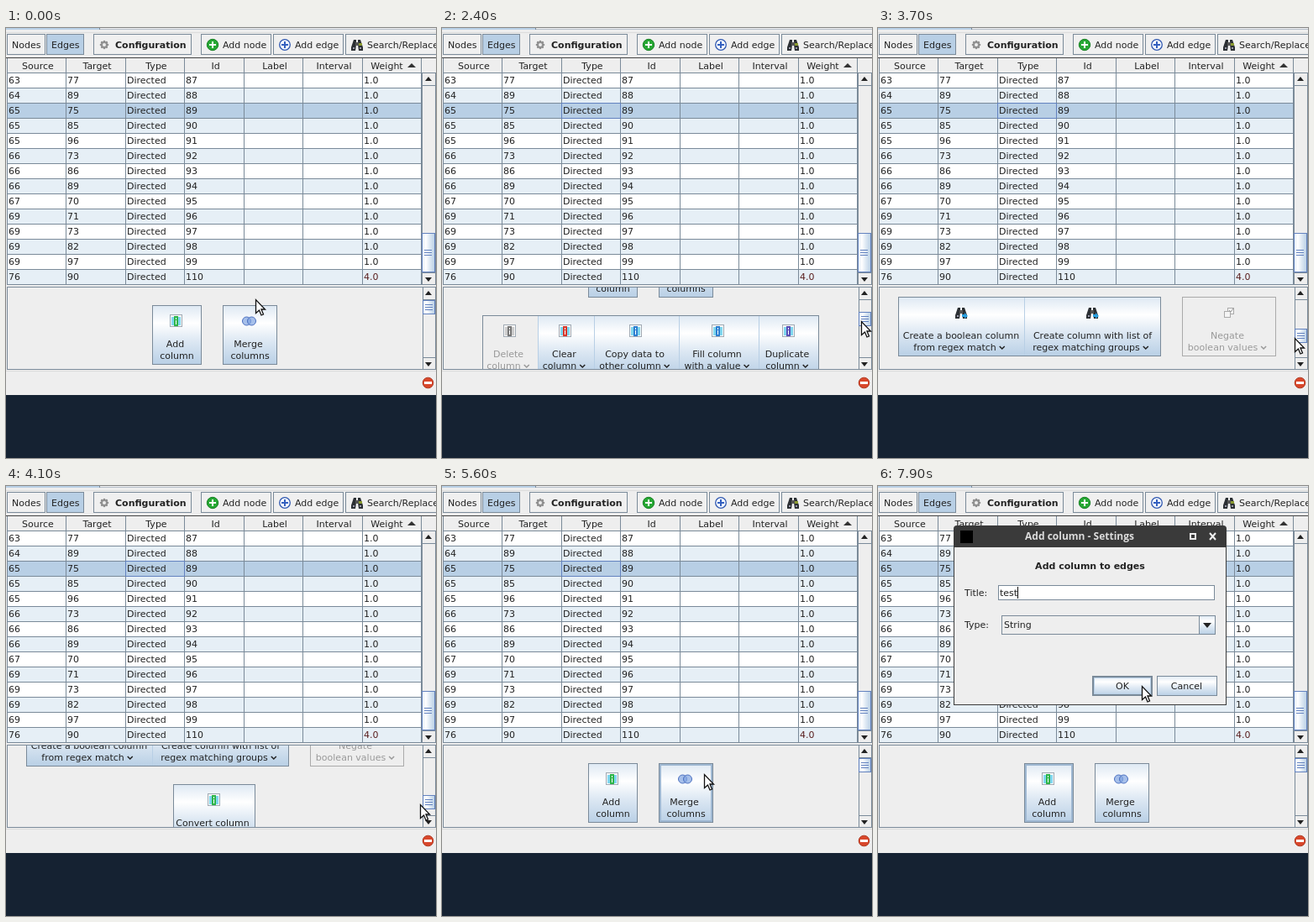
Recreate the animation shown at these times as an HTML page with a canvas. Size 512 px wide and 512 px high, loop 8 s.

```html
<!DOCTYPE html>
<html>
<head>
<meta charset="utf-8">
<style>
html, body { margin: 0; width: 100%; height: 100%; overflow: hidden; background: #152232; }
canvas { display: block; }
</style>
</head>
<body>
<canvas id="stage" width="512" height="512"></canvas>
<script>
const c = document.getElementById('stage').getContext('2d');
const FONT = '11px "DejaVu Sans", sans-serif', BOLD = 'bold ' + FONT;
const GRID = '#7a8a99', BG = '#eeeeee', SEL = '#b8cfe5', INK = '#222222', DIM = '#999999';
const TYPED = 'test';

// time, pointer x, pointer y
const PATH = [
  [100, 297, 323], [400, 377, 350], [500, 377, 350], [1400, 500, 335], [1500, 499, 335],
  [1900, 499, 335], [2400, 499, 349], [2800, 499, 349], [2900, 499, 351], [3100, 499, 351],
  [3300, 499, 359], [4100, 493, 379], [4300, 492, 383], [4500, 492, 383], [4800, 491, 345],
  [5100, 491, 335], [5300, 491, 335], [5800, 192, 348], [6200, 192, 348], [6600, 389, 166],
  [6700, 389, 166], [7000, 168, 130], [7500, 168, 130], [7900, 314, 238]
];
const ROWS = ['63 77', '64 89', '65 75', '65 85', '65 96', '66 73', '66 86', '66 89',
  '67 70', '69 71', '69 73', '69 82', '69 97', '76 90'];
const COLS = [1, 71, 142, 212, 283, 353, 424, 494];
const HEADS = ['Source', 'Target', 'Type', 'Id', 'Label', 'Interval', 'Weight'];

// Button groups: row, x edges, then label lines and icon per button
const GROUPS = [
  [0, [174, 233], [['Add', 'column'], columnIcon('#2fb54a')]],
  [0, [258, 323], [['Merge', 'columns'], mergeIcon]],
  [1, [48, 114, 181, 282, 377, 449],
    [['Delete', 'column'], columnIcon('#777', '#ccc'), 1, 1],
    [['Clear', 'column'], columnIcon('#d8382c'), 1],
    [['Copy data to', 'other column'], columnIcon('#2f7fd0'), 1],
    [['Fill column', 'with a value'], columnIcon('#2f7fd0'), 1],
    [['Duplicate', 'column'], columnIcon('#5a4fb5'), 1]],
  [2, [24, 174, 337],
    [['Create a boolean column', 'from regex match'], searchIcon, 1],
    [['Create column with list of', 'regex matching groups'], searchIcon, 1]],
  [2, [362, 474], [['Negate', 'boolean values'], negateIcon, 1, 1]],
  [3, [199, 297], [['Convert column', 'to dynamic'], columnIcon('#2fb54a'), 1]]
];

function pointerAt(t) {
  let i = 0;
  while (i < PATH.length - 1 && PATH[i + 1][0] <= t) i++;
  const a = PATH[i], b = PATH[i + 1] || a;
  const k = b === a ? 0 : Math.max(0, (t - a[0]) / (b[0] - a[0]));
  return [1, 2].map(j => Math.round(a[j] + (b[j] - a[j]) * k));
}

function rect(x, y, w, h, fill) { c.fillStyle = fill; c.fillRect(x, y, w, h); }
function frame(x, y, w, h, color, width = 1) {
  c.strokeStyle = color; c.lineWidth = width;
  c.strokeRect(x + width / 2, y + width / 2, w - width, h - width);
}
function box(x, y, w, h, fill, edge = GRID) { rect(x, y, w, h, fill); frame(x, y, w, h, edge); }
function text(s, x, y, color = INK, align = 'left', font = FONT) {
  c.font = font; c.fillStyle = color; c.textAlign = align; c.fillText(s, x, y);
}
function poly(pts, fill, stroke, width = 1, open = false) {
  c.beginPath();
  for (let i = 0; i < pts.length; i += 2) c.lineTo(pts[i], pts[i + 1]);
  if (!open) c.closePath();
  if (fill) { c.fillStyle = fill; c.fill(); }
  if (stroke) { c.strokeStyle = stroke; c.lineWidth = width; c.stroke(); }
}
function disc(x, y, r, fill, stroke, width = 1) {
  c.beginPath(); c.arc(x, y, r, 0, 7);
  if (fill) { c.fillStyle = fill; c.fill(); }
  if (stroke) { c.strokeStyle = stroke; c.lineWidth = width; c.stroke(); }
}
function plus(x, y, r, color) {
  rect(x - r, y - 1, 2 * r, 2, color);
  rect(x - 1, y - r, 2, 2 * r, color);
}
function gloss(x0, y0, x1, y1) {
  const g = c.createLinearGradient(x0, y0, x1, y1);
  [[0, '#dde8f3'], [.3, '#fff'], [.6, '#dde8f3'], [1, SEL]].forEach(s => g.addColorStop(...s));
  return g;
}

function columnIcon(bar, side = '#7fd6ee') {
  return (x, y) => {
    box(x - 8, y - 8, 15, 15, '#f8f8f8', '#a0aab4');
    rect(x - 6, y - 5, 3, 10, side);
    rect(x + 2, y - 5, 3, 10, side);
    rect(x - 3, y - 6, 5, 12, bar);
    rect(x - 1, y - 4, 1, 2, '#fff');
    rect(x - 1, y - 1, 1, 5, '#fff');
  };
}
function mergeIcon(x, y) {
  for (const dx of [-3, 3]) disc(x + dx - .5, y, 5, 'rgba(130,165,225,.7)', '#4a6fc0');
}
function binoculars(x, y) {
  for (const s of [-1, 1])
    poly([x + s, y - 6, x + 4 * s, y - 6, x + 7 * s, y + 3, x + 7 * s, y + 7, x + 2 * s, y + 7, x + s, y], '#2b2f33');
  rect(x - 2, y - 3, 4, 4, '#555');
  rect(x - 5, y + 3, 2, 2, '#99a');
  rect(x + 3, y + 3, 2, 2, '#99a');
}
function searchIcon(x, y) {
  binoculars(x, y);
  poly([x + 1, y + 2, x + 4, y + 2, x + 4, y, x + 8, y + 4, x + 4, y + 7, x + 4, y + 5, x + 1, y + 5], '#2aa0e0');
}
function negateIcon(x, y) {
  box(x - 2, y - 6, 8, 8, '#f4f4f4', '#aaa');
  box(x - 6, y - 2, 8, 8, '#f4f4f4', '#aaa');
  poly([x, y - 3, x + 2, y - 1, x + 5, y - 5], null, '#999', 1, true);
}
function errorIcon(x, y) {
  poly([x - 3, y - 8, x + 3, y - 8, x + 8, y - 3, x + 8, y + 3, x + 3, y + 8, x - 3, y + 8, x - 8, y + 3, x - 8, y - 3],
    '#cc1f24', '#8f1418');
  rect(x - 1, y - 5, 2, 6, '#fff');
  rect(x - 1, y + 3, 2, 2, '#fff');
}

function toolbar() {
  rect(0, 0, 512, 437, BG);
  rect(0, 0, 111, 2, SEL);
  rect(111, 0, 1, 2, GRID);
  rect(112, 1, 400, 1, '#b4bec8');
  rect(0, 5, 512, 1, '#dcdcdc');
  for (const [x, w, s, tx, font] of [[1, 46, 'Nodes', 7], [48, 45, 'Edges', 54],
    [104, 117, 'Configuration', 130, BOLD], [232, 84, 'Add node', 258],
    [318, 84, 'Add edge', 344], [404, 120, 'Search/Replace', 430]]) {
    box(x, 7, w, 25, s === 'Edges' ? SEL : '#f0f0f0');
    text(s, tx, 24, INK, 'left', font);
  }
  for (let i = 0; i < 8; i++) {
    const a = i * Math.PI / 4;
    disc(117 + 4 * Math.cos(a), 20 + 4 * Math.sin(a), 1.3, '#909090');
  }
  disc(117, 20, 3, '#eee', '#909090', 2);
  disc(246, 20, 6.7, '#27a834', '#168022');
  plus(246, 20, 4, '#fff');
  disc(332, 20, 6.3, '#f4f8ff', '#3058b0', 1.3);
  plus(332, 20, 4, '#3460c0');
  binoculars(418, 20);
  rect(420, 18, 4, 3, '#8a9a30');
}

function arrow(x, y, dir) { poly([x - 4, y + 2 * dir, x + 4, y + 2 * dir, x, y - 3 * dir], '#222'); }
function scrollbar(x, y, h, thumb, size) {
  const w = 512 - x;
  box(x, y, w, h, BG);
  frame(x, y, w, 16, GRID);
  frame(x, y + h - 15, w, 15, GRID);
  arrow(503, y + 8, 1);
  arrow(503, y + h - 7, -1);
  box(x, thumb, w - 1, size, gloss(x, 0, 511, 0), '#6382bf');
  const mid = thumb + (size >> 1);
  for (const dy of [-3, 0, 3]) rect(x + 3, mid + dy, 9, 1, '#6382bf');
}

function table(focused) {
  rect(0, 35, 512, 1, '#444');
  rect(1, 53, 494, 1, GRID);
  ROWS.forEach((row, i) => {
    const y = 54 + 18 * i, last = i === ROWS.length - 1;
    rect(1, y, 494, 17, i === 2 ? SEL : i % 2 ? '#e6eff6' : '#fff');
    rect(1, y + 17, 494, 1, GRID);
    const [from, to] = row.split(' ');
    [from, to, 'Directed', last ? 110 : 87 + i].forEach((s, j) => text(s, j ? COLS[j] + 2 : 3, y + 12));
    text(last ? '4.0' : '1.0', 426, y + 12, last ? '#5a2020' : INK);
  });
  COLS.forEach(x => rect(x, 36, 1, 270, GRID));
  HEADS.forEach((s, i) => text(s, i < 6 ? (COLS[i] + COLS[i + 1]) / 2 + 2 : 453.5, 49, INK, 'center'));
  poly([478, 47, 488, 47, 483, 42], '#333');
  if (focused) frame(142, 89, 71, 19, '#6382bf');
  scrollbar(495, 53, 253, 244, 47);
}

function panel(drag, hot, pressed) {
  box(1, 308, 511, 99, BG);
  c.save();
  c.beginPath(); c.rect(2, 309, 494, 97); c.clip();
  for (const [row, xs, ...buttons] of GROUPS) {
    const y = 330 + 92 * row - Math.round(5.7 * drag);
    buttons.forEach(([lines, icon, menu, off], i) => {
      const x = xs[i], w = xs[i + 1] - x, mid = x + w / 2, ink = off ? DIM : INK;
      rect(x, y, w, 71, off ? BG : pressed && lines[0] === 'Add' ? SEL : gloss(0, y, 0, y + 71));
      if (i) rect(x, y, 1, 71, SEL);
      icon(Math.floor(mid), y + 19);
      text(lines[0], mid - (lines[0].length > 20 ? 0 : 2), y + 50, ink, 'center');
      text(lines[1], mid - (menu ? 7.5 : 0), y + 64, ink, 'center');
      if (menu) {
        const cx = mid - 2 + c.measureText(lines[1]).width / 2 + 1.5, cy = y + 59;
        poly([cx - 3, cy, cx, cy + 3, cx + 3, cy], null, ink, 1.5, true);
      }
      if (hot(lines[0], x, y, w)) frame(x + 1, y + 1, w - 2, 69, '#9fb8d2', 2);
    });
    frame(xs[0], y, xs[xs.length - 1] - xs[0], 71, buttons[0][3] && buttons.length < 2 ? '#aaa' : GRID);
  }
  c.restore();
  scrollbar(496, 308, 99, 324 + drag, 17);
  rect(0, 408, 512, 1, '#dadada');
  disc(502.5, 422.5, 6.3, '#d9472b', '#b03a22');
  rect(498, 421, 9, 3, '#fff');
}

function dialog(t, over) {
  const typed = TYPED.slice(0, Math.max(0, (t - 7200) / 100)), bad = !typed;
  c.fillStyle = '#3a3a3a';
  c.beginPath(); c.roundRect(90, 47, 325, 214, [4, 4, 0, 0]); c.fill();
  rect(91, 73, 323, 187, BG);
  rect(98, 53, 15, 15, '#000');
  text('Add column - Settings', 240, 64, '#dcdcdc', 'center', 'bold 12px "Open Sans", "Noto Sans", sans-serif');
  frame(371, 56, 8, 8, '#eee', 2);
  poly([395, 56, 402, 64], null, '#eee', 2, true);
  poly([402, 56, 395, 64], null, '#eee', 2, true);
  text('Add column to edges', 252.5, 99, INK, 'center', BOLD);

  text('Title:', 103, 131);
  box(143, 118, 258, 18, bad ? '#fff0f0' : '#fff');
  text(typed, 145, 131);
  if (!bad || t < 6500) rect(145 + Math.round(c.measureText(typed).width), 120, 1, 14, '#111');
  text('Type:', 103, 169);
  box(147, 154, 255, 23, BG);
  box(382, 154, 20, 23, gloss(0, 154, 0, 177));
  poly([387, 163, 397, 163, 392, 169], '#222');
  text('String', 150, 169);
  if (bad) {
    errorIcon(390, 127);
    errorIcon(104, 197);
    text("Column title can't be empty", 116, 201, '#f00000');
  }
  box(255, 226, 72, 24, bad ? BG : gloss(0, 226, 0, 250), bad ? '#aaa' : GRID);
  if (!bad) frame(255, 226, 72, 24, GRID, 2);
  if (!bad && over(255, 226, 72, 24)) frame(257, 228, 68, 20, SEL);
  text('OK', 291, 242, bad ? DIM : INK, 'center');
  box(332, 226, 72, 24, gloss(0, 226, 0, 250));
  text('Cancel', 367.5, 242, INK, 'center');
}

function pointer(x, y, beam) {
  if (beam) {
    rect(x, y - 8, 1, 16, '#111');
    rect(x - 3, y - 8, 7, 1, '#111');
    rect(x - 3, y + 8, 7, 1, '#111');
    return;
  }
  const p = [0, 0, 0, 16, 4, 12.5, 6.5, 18.5, 9, 17.5, 6.5, 11.5, 11, 11.5];
  poly(p.map((v, i) => v + (i % 2 ? y : x) + .5), '#fff', '#111', 1.3);
}

function draw(t) {
  const [x, y] = pointerAt(t), open = t >= 6000;
  const over = (bx, by, w, h) => x >= bx && x < bx + w && y >= by && y < by + h;
  const drag = t > 1900 && t < 5100 ? y - 335 : 0;
  const hot = (name, bx, by, w) => name === 'Add' && t >= 5800 || !open && !drag && over(bx, by, w, 71);
  rect(0, 0, 512, 512, '#152232');
  toolbar();
  table(t >= 1400 && !open);
  panel(drag, hot, t === 5900);
  if (open) dialog(t, over);
  pointer(x, y, open && over(144, 118, 238, 18));
}

function tick(now) {
  draw(Math.floor(now % 8000 / 100) * 100);
  requestAnimationFrame(tick);
}
requestAnimationFrame(tick);
</script>
</body>
</html>
```
